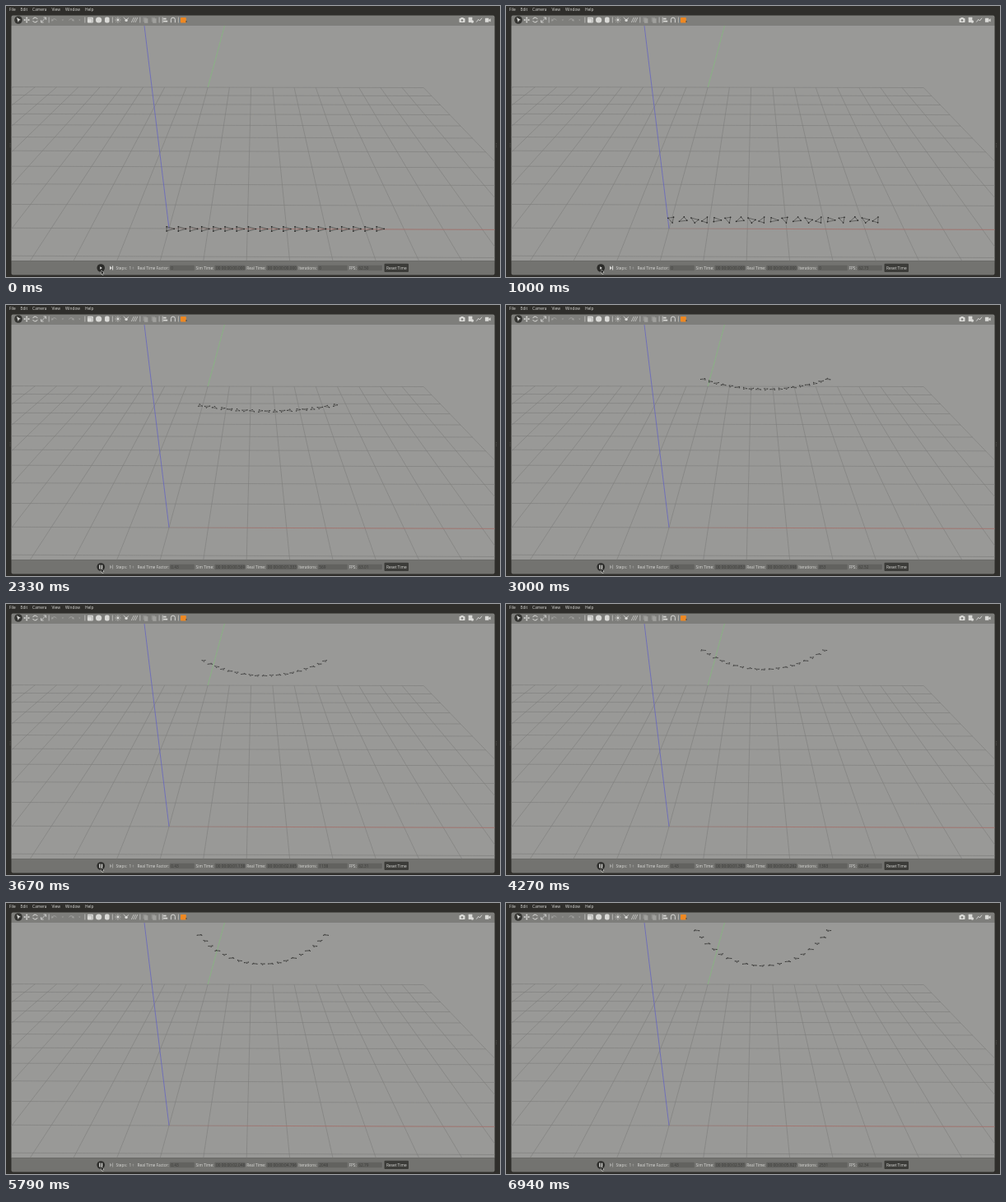
Recreate the animation shown at these times as an HTML page with a canvas. Size 600 by 330 pixels, loop 7000 ms.

```html
<!DOCTYPE html>
<html lang="en">
<head>
<meta charset="utf-8">
<title>Drone swarm simulation</title>
<style>
html, body { margin: 0; width: 100%; height: 100%; overflow: hidden; background: #2f2e2b; }
canvas { display: block; width: 600px; height: 330px; }
</style>
</head>
<body>
<canvas id="stage" width="600" height="330"></canvas>
<script>
const ctx = document.getElementById('stage').getContext('2d');
const { PI, sin, cos, exp } = Math;
const LOOP = 7000, START = 1000, STEP = 66.6;
const DRONES = 19, TIME_FACTOR = 0.427;
const VANISH = { x: 303, y: -112 }, ORIGIN = { x: 198, y: 271 };
const CELL = 47.6, CAMERA = 12.26;
const LEFT = 6.5, WIDTH = 587, SCENE_TOP = 24, SCENE_BOTTOM = 310.5;
const LIGHT = '#dadad7', DIM = '#a0a09d', DARK = '#353532', TOOLBAR = '#7e7e7b';
const FONT = '4.8px "Open Sans", "Noto Sans", sans-serif';

function line(color, width, ...points) {
  ctx.strokeStyle = color;
  ctx.lineWidth = width;
  ctx.beginPath();
  for (let i = 0; i < points.length; i += 2) ctx.lineTo(points[i], points[i + 1]);
  ctx.stroke();
}

function shape(color, ...points) {
  ctx.fillStyle = color;
  ctx.beginPath();
  for (let i = 0; i < points.length; i += 2) ctx.lineTo(points[i], points[i + 1]);
  ctx.fill();
}

function rect(color, x, y, w, h, radius = 0) {
  ctx.fillStyle = color;
  ctx.beginPath();
  ctx.roundRect(x, y, w, h, radius);
  ctx.fill();
}

function disc(color, x, y, r) {
  ctx.fillStyle = color;
  ctx.beginPath();
  ctx.arc(x, y, r, 0, 2 * PI);
  ctx.fill();
}

function arc(color, x, y, r, from, to) {
  ctx.strokeStyle = color;
  ctx.lineWidth = 1;
  ctx.beginPath();
  ctx.arc(x, y, r, from, to);
  ctx.stroke();
}

// Draws a label and returns the x where it ends
function text(str, x, y, color) {
  ctx.fillStyle = color;
  ctx.fillText(str, x, y);
  return x + ctx.measureText(str).width;
}

function at(x, y, draw) {
  ctx.save();
  ctx.translate(x, y);
  draw();
  ctx.restore();
}

// Calls draw for count evenly turned copies
function around(count, draw) {
  for (let i = 0; i < count; i++) {
    draw();
    ctx.rotate(2 * PI / count);
  }
}

// Ground plane in perspective: column and row count grid cells from the origin
function ground(col, row) {
  const depth = CAMERA / (CAMERA + row);
  const x = VANISH.x + (ORIGIN.x - VANISH.x + col * CELL) * depth;
  const y = VANISH.y + (ORIGIN.y - VANISH.y) * depth + (x - ORIGIN.x) * 0.0035 * depth;
  return [x, y];
}

function drawScene() {
  ctx.save();
  ctx.beginPath();
  ctx.rect(LEFT, SCENE_TOP, WIDTH, SCENE_BOTTOM - SCENE_TOP);
  ctx.clip();
  rect('#999997', 0, 0, 600, 330);
  for (let k = -10; k <= 10; k++) {
    line('#7d7d7b', 0.6, ...ground(k, -3), ...ground(k, 10));
    line('#7d7d7b', 0.6, ...ground(-10, k), ...ground(10, k));
  }
  const red = ctx.createLinearGradient(ORIGIN.x, 0, 330, 0);
  red.addColorStop(0, 'rgba(185,105,98,.2)');
  red.addColorStop(1, 'rgba(185,105,98,.8)');
  line(red, 0.7, ...ground(0, 0), ...ground(10, 0));
  line('#84b87e', 0.75, ...ground(0, 10), 265.5, SCENE_TOP);
  line('#6262c2', 0.75, ORIGIN.x, ORIGIN.y, 168, SCENE_TOP);
  ctx.restore();
}

// The row climbs away from the camera while it bends into an arc
function formation(s) {
  if (s < 0) return { center: 326.5, half: 127.5, end: 271.5, sag: 0 };
  return {
    center: 311 + 14.5 * exp(-0.6 * s),
    half: 60.8 + 3.2 * s + 63.7 * exp(-s),
    end: 28 + 215 * exp(-0.62 * s) + 17.5 * exp(-5 * s),
    sag: 65 * (1 - exp(-((s / 5.63) ** 1.5)))
  };
}

function drawDrone(x, y, scale, flat, angle) {
  const points = [0, 2.4, -2.4].map(offset => [
    x + cos(angle + offset) * 5.2 * scale,
    y + sin(angle + offset) * 5.2 * scale * flat
  ]);
  line('#41413f', 0.65 * Math.sqrt(scale), ...points.flat(), ...points[0]);
  for (const [px, py] of points) disc('#222221', px, py, 0.85 * scale);
}

function drawSwarm(s) {
  const { center, half, end, sag } = formation(s);
  const bend = Math.max(0.002, 2 * Math.atan(sag / half)), radius = half / sin(bend);
  const scale = half / 127.5, flat = 0.2 + 0.55 * (end - 28) / 243;
  for (let i = 0; i < DRONES; i++) {
    const a = bend * (2 * i / (DRONES - 1) - 1);
    const yaw = s < 0 ? 0 : 1.35 + i * 2 * PI / 5 - s * 2.3;
    drawDrone(center + radius * sin(a), end + sag - radius * (1 - cos(a)), scale, flat, yaw);
  }
}

// Toolbar icons, each drawn around 0,0
function selectIcon() {
  disc(DARK, 0, 0, 4.8);
  shape(LIGHT, -2, -3, 3, 0, 0.8, 0.6, -0.2, 3);
}
function moveIcon() {
  around(4, () => {
    line(LIGHT, 0.8, 0, 0, 3, 0);
    shape(LIGHT, 3.8, 0, 2, -1.3, 2, 1.3);
  });
}
function rotateIcon() {
  around(2, () => arc(LIGHT, 0, 0, 2.9, 0.3, 2.8));
}
function scaleIcon() {
  line(LIGHT, 0.8, -3, 3, 3, -3);
  around(2, () => line(LIGHT, 0.8, 0, -3, 3, -3, 3, 0));
}
function undoIcon() {
  arc(DIM, 0, 1.5, 2.8, 3.5, 5.9);
  shape(DIM, -3.6, 1.6, -0.8, 1, -3, -1.6);
}
function redoIcon() {
  ctx.scale(-1, 1);
  undoIcon();
}
function menuIcon() { shape(DIM, -1.2, -0.6, 1.2, -0.6, 0, 1); }
function boxIcon() {
  rect(LIGHT, -3.5, -3.2, 7, 6.6, 1);
  line(DIM, 0.6, -3.4, -1.6, 2, -1.6, 2, 3.4);
}
function sphereIcon() { disc(LIGHT, 0, 0, 3.6); }
function cylinderIcon() { rect(LIGHT, -2.8, -3.5, 5.6, 7, 2); }
function pointLightIcon() {
  disc(LIGHT, 0, 0, 1.4);
  around(8, () => line(LIGHT, 0.6, 2, 0, 3.6, 0));
}
function spotLightIcon() {
  disc(LIGHT, 0, 0.4, 1.7);
  line(LIGHT, 0.8, -3.4, -3, 0, 0, 3, -2.6);
}
function sunIcon() {
  for (let x = -4; x < 2; x += 2.3) line(LIGHT, 0.7, x, 3, x + 3, -3);
}
function copyIcon() {
  rect('#91918e'.replace('919', '919'), -3, -3.2, 4.4, 5.6);
  rect(DIM, -1.4, -1.8, 4.4, 5.6);
}
function alignIcon() {
  line(LIGHT, 0.8, -2.5, -3.4, -2.5, 3.5);
  rect(LIGHT, -1.5, -2.3, 3.4, 1.8);
  rect(LIGHT, -1.5, 0.7, 5, 1.8);
}
function magnetIcon() {
  arc(LIGHT, 0, -0.4, 2.5, PI, 0);
  for (const x of [-2.5, 2.5]) line(LIGHT, 1, x, -0.5, x, 3.2);
}
function viewIcon() {
  rect('#ee8822', -4, -3, 6.8, 6.6, 0.8);
  shape(DARK, 2, 1.4, 4, 1.4, 3, 3);
}
function cameraIcon() {
  rect(LIGHT, -3.5, -2, 7, 5, 0.8);
  rect(LIGHT, -1.6, -3, 3.2, 1.5);
  disc(TOOLBAR, 0, 0.5, 1.3);
}
function logIcon() {
  rect(LIGHT, -2.7, -3.2, 4.6, 6.2, 0.5);
  disc(LIGHT, 2, 2, 1.7);
}
function plotIcon() { line(LIGHT, 0.9, -3.4, 2.5, -1, -0.7, 0.6, 1, 3.2, -2.3); }
function videoIcon() {
  rect(LIGHT, -3.3, -2.2, 4.5, 5, 0.6);
  shape(LIGHT, 1, 0, 3.4, -1.8, 3.4, 2.3, 1, 1);
}

const TOOLS = [
  [selectIcon, moveIcon, rotateIcon, scaleIcon],
  [undoIcon, menuIcon, redoIcon, menuIcon],
  [boxIcon, sphereIcon, cylinderIcon],
  [pointLightIcon, spotLightIcon, sunIcon],
  [copyIcon, copyIcon],
  [alignIcon, magnetIcon],
  [viewIcon]
];
const CAPTURE_TOOLS = [cameraIcon, logIcon, plotIcon, videoIcon];

function drawToolbar() {
  const pitch = 10.2, gap = 13.1, y = 17;
  rect(TOOLBAR, LEFT, 11.4, WIDTH, SCENE_TOP - 11.4, [2, 2, 0, 0]);
  let x = 15;
  TOOLS.forEach((group, g) => {
    if (g) line('#cfcfcc', 0.7, x - gap / 2, 13.5, x - gap / 2, 20.5);
    group.forEach((icon, i) => at(x + i * pitch, y, icon));
    x += (group.length - 1) * pitch + gap;
  });
  CAPTURE_TOOLS.forEach((icon, i) => at(554 + i * 10.4, y, icon));
}

function drawMenu() {
  let x = 4;
  for (const name of ['File', 'Edit', 'Camera', 'View', 'Window', 'Help'])
    x = text(name, x, 6, LIGHT) + 6;
}

function timestamp(ms) {
  return '00 00:00:' + (ms / 1000).toFixed(3).padStart(6, '0');
}

function drawPlayControls(playing) {
  disc('#2b2b29', 115.2, 319, 4.8);
  if (playing) {
    for (const x of [113.2, 115.8]) rect(LIGHT, x, 316.6, 1.4, 4.8);
  } else {
    shape(LIGHT, 114.2, 317.2, 116.9, 319, 114.2, 320.8);
  }
  const color = playing ? DIM : LIGHT;
  shape(color, 126, 316.6, 128.8, 319, 126, 321.4);
  rect(color, 129, 316.6, 1.1, 4.8);
}

function drawStatus(time, s) {
  const baseline = 320.8, playing = s > 0.03;
  const sim = playing ? Math.round(s * 1000 * TIME_FACTOR) : 0;
  const fps = time < 390 ? 62.5 : playing ? 62.7 + 0.4 * sin(2 * s - 0.4) : 62.73;
  rect('#737370', LEFT, SCENE_BOTTOM, WIDTH, 17, [0, 0, 2, 2]);
  drawPlayControls(playing);
  text('Steps:', 133.5, baseline, LIGHT);
  text('1', 149.6, baseline, LIGHT);
  shape(DIM, 153.4, 318.8, 155.4, 318.8, 154.4, 317.4);
  shape(DIM, 153.4, 319.4, 155.4, 319.4, 154.4, 320.8);

  const fields = [
    ['Real Time Factor:', playing ? '0.43' : '0', 30],
    ['Sim Time:', timestamp(sim), 37],
    ['Real Time:', timestamp(sim / TIME_FACTOR), 37],
    ['Iterations:', String(sim), 36],
    ['FPS:', fps.toFixed(2), 30]
  ];
  let x = 159.5;
  for (const [name, value, width] of fields) {
    x = text(name, x, baseline, LIGHT) + 1;
    rect('#62625f', x, 315.8, width, 6.4, 0.8);
    text(value, x + 1.5, baseline, '#3a3a38');
    x += width + 1.8;
  }
  rect('#3c3c39', 459.5, 313.7, 29.5, 10.3, 1);
  text('Reset Time', 462, baseline, LIGHT);
}

function drawCursor(y) {
  at(116, y, () => {
    shape(LIGHT, -0.3, -0.6, 3.4, 3.6, 1.8, 3.9, 2.4, 5.7, 1.2, 5.9, -0.3, 4.6);
    shape('#111110', 0.1, 0.4, 2.5, 3.2, 1.3, 3.4, 1.9, 5.2, 1.2, 5.3, 0.1, 3.9);
  });
}

function drawFrame(time) {
  const steps = Math.floor((Math.min(time, 6940) - START + 5) / STEP);
  const s = time < START ? -1 : steps * STEP / 1000;
  ctx.font = FONT;
  rect('#2f2e2b', 0, 0, 600, 330);
  drawMenu();
  for (const x of [4.6, 595.2])
    for (let y = 167; y <= 171; y += 2) rect('#55544f', x, y, 0.9, 0.9);
  drawScene();
  drawSwarm(s);
  drawToolbar();
  drawStatus(time, s);
  drawCursor(time < 60 ? 321.8 : 320.8);
}

function tick() {
  drawFrame(performance.now() % LOOP);
  requestAnimationFrame(tick);
}
tick();
</script>
</body>
</html>
```
